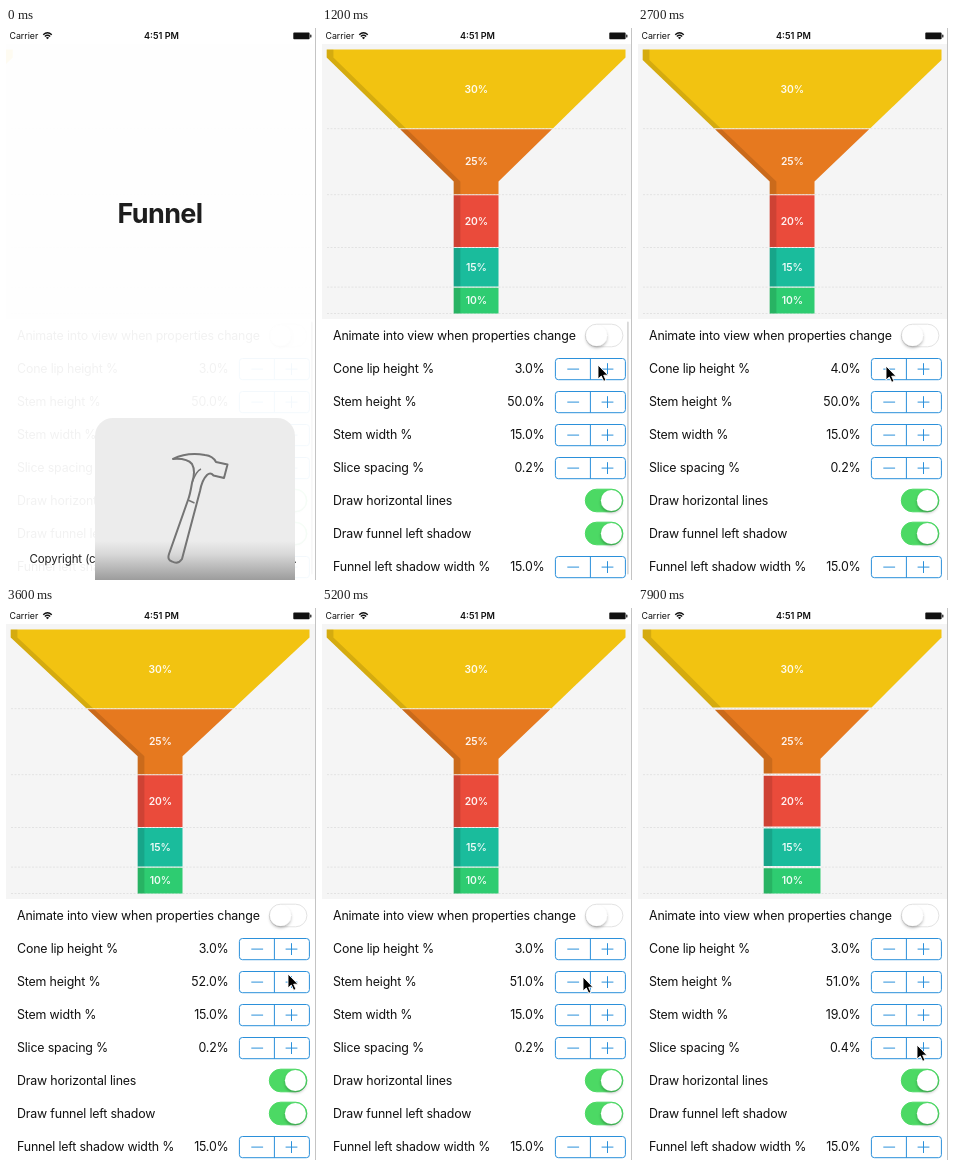
An HTML page that plays this animation: 310 by 552 pixels, repeating every 8 s.

```html
<!DOCTYPE html>
<html lang="en">
<head>
<meta charset="utf-8">
<title>Funnel chart settings</title>
<style>
  html, body { margin: 0; width: 100%; height: 100%; overflow: hidden; background: #fff; }
  svg { display: block; width: 100vw; height: 100vh; font-family: Inter, Roboto, sans-serif; }
  .row { font-size: 12.4px; letter-spacing: -.17px; fill: #111; }
  .label { font-size: 10.3px; font-weight: 600; letter-spacing: -.1px; fill: #fff; fill-opacity: .93; text-anchor: middle; }
</style>
</head>
<body>
<svg id="stage" viewBox="0 0 310 552">
  <defs>
    <linearGradient id="shade" x1="0" y1="0" x2="0" y2="1">
      <stop offset=".76" stop-color="#ececec"/>
      <stop offset=".84" stop-color="#d8d8d8"/>
      <stop offset="1" stop-color="#9c9c9c"/>
    </linearGradient>
    <filter id="soft" x="-50%" y="-50%" width="200%" height="200%">
      <feDropShadow dx="0" dy="2" stdDeviation="1.4" flood-opacity=".28"/>
    </filter>
  </defs>
  <rect width="310" height="552" fill="#fff"/>
  <g id="splash">
    <text x="154" y="195" text-anchor="middle" font-size="27" font-weight="700" letter-spacing="-.6" fill="#111">Funnel</text>
    <text x="23.500" y="534.5" font-size="11.5" letter-spacing="-.1" fill="#222">Copyright (c)</text>
    <text x="287.5" y="534.5" font-size="11.5" fill="#222">.</text>
  </g>
  <g id="app">
    <rect y="16" width="310" height="275" fill="#f5f5f5"/>
    <g id="chart"></g>
    <g id="table"></g>
    <rect id="scroller" x="305" y="293.5" width="1.8" height="253" rx=".9" fill="#8b8b8b"/>
  </g>
  <g id="hud">
    <path d="M89 552V408a18 18 0 0 1 18-18H271a18 18 0 0 1 18 18V552Z" fill="url(#shade)"/>
    <path d="M167 431Q181 424 199 427Q207 428 210 434L221.500 436.500L218 450L207.500 447.500Q204.500 444 201 447Q196 452 194 463L176 531Q172 537 166 533.500Q161 532 163 526L182 472Q184 467 186 455Q190 443 186 436Q181 430 167 431Z"
      fill="none" stroke="#747474" stroke-width="2" stroke-linejoin="round"/>
    <path d="M182 472L188.500 475M186 455Q190 443 195 441" fill="none" stroke="#747474" stroke-width="1.4"/>
  </g>
  <g fill="#111">
    <text x="3.500" y="11.200" font-size="8.8">Carrier</text>
    <text x="155.500" y="11.200" font-size="9.1" font-weight="600" text-anchor="middle">4:51 PM</text>
    <path d="M37.200 6.700Q41.500 2.700 45.800 6.700M38.800 8.500Q41.500 6 44.200 8.500" fill="none" stroke="#111" stroke-width="1.300"/>
    <path d="M41.500 11.300L39.900 9.700Q41.500 8.300 43.100 9.700Z"/>
    <rect x="287.300" y="4.600" width="16.300" height="6.700" rx=".8"/>
    <rect x="304.200" y="6.500" width="1.200" height="3" rx=".5"/>
  </g>
  <path d="M309.500 0V552" stroke="#c4c4c4"/>
  <path id="cursor" d="M0 0V14L3.300 11L5.700 16.300L8 15.300L5.700 10.200H10Z" fill="#000" stroke="#fff" stroke-width=".9" stroke-linejoin="round"/>
</svg>
<script>
const LOOP = 8000, STEP = 100;
const BOX = { x: 4.7, y: 21.5, w: 298.8, h: 264 };
const SLICES = [[30, '#f2c311'], [25, '#e6791f'], [20, '#ea4b3b'], [15, '#1abc9c'], [10, '#2ecc71']];
const ROWS = [
  ['Animate into view when properties change', false],
  ['Cone lip height %', 'lip'],
  ['Stem height %', 'stem'],
  ['Stem width %', 'width'],
  ['Slice spacing %', 'gap'],
  ['Draw horizontal lines', true],
  ['Draw funnel left shadow', true],
  ['Funnel left shadow width %', 'shadow']
];
const START = { lip: 3, stem: 50, width: 15, gap: .2, shadow: 15 };
// Stepper presses: time, property, change
const PRESSES = [
  [1300, 'lip', 1], [1500, 'lip', 1], [1800, 'lip', 1],
  [2400, 'lip', -1], [2600, 'lip', -1], [2800, 'lip', -1],
  [3300, 'stem', 1], [3500, 'stem', 1], [3900, 'stem', 1],
  [4600, 'stem', -1], [4900, 'stem', -1],
  [5700, 'width', 1], [5900, 'width', 1], [6100, 'width', 1], [6300, 'width', 1],
  [7100, 'gap', .1], [7400, 'gap', .1]
];
const CURSOR = [
  [700, 262, 420], [1100, 276, 337], [2000, 276, 337], [2300, 248, 338], [2850, 248, 338],
  [3200, 282, 366], [4100, 282, 366], [4500, 261, 369], [5200, 261, 369],
  [5600, 284, 403], [6350, 284, 403], [6600, 288, 417], [7000, 279, 437]
];

const $ = id => document.getElementById(id);
const clamp = v => Math.max(0, Math.min(1, v));

function add(parent, tag, attrs, text) {
  const node = document.createElementNS('http://www.w3.org/2000/svg', tag);
  set(node, attrs);
  if (text) node.textContent = text;
  return parent.appendChild(node);
}
function set(node, attrs) {
  for (const key in attrs) node.setAttribute(key, attrs[key]);
}

function addSwitch(y, on) {
  add($('table'), 'rect', {
    x: 263.3, y: y - 11.3, width: 37.6, height: 22.6, rx: 11.3,
    fill: on ? '#4cd964' : '#fff', stroke: on ? '#4cd964' : '#e3e3e3'
  });
  add($('table'), 'circle', { cx: on ? 289.4 : 274.6, cy: y, r: 10.5, fill: '#fff', filter: 'url(#soft)' });
}
function addStepper(y) {
  const blue = { fill: 'none', stroke: '#2b90da', 'stroke-width': 1 };
  add($('table'), 'rect', { x: 233.4, y: y - 10.6, width: 70, height: 21.2, rx: 3, ...blue });
  add($('table'), 'path', { d: `M268.400 ${y - 10.6}v21.2M245.300 ${y}h11.800M279.600 ${y}h11.800M285.500 ${y - 5.9}v11.800`, ...blue });
}

const values = {};
ROWS.forEach(([name, kind], i) => {
  const y = 307.5 + 33 * i;
  add($('table'), 'text', { x: 11, y: y + 4.4, class: 'row' }, name);
  if (typeof kind === 'boolean') return addSwitch(y, kind);
  values[kind] = add($('table'), 'text', { x: 222.6, y: y + 4.8, class: 'row', 'text-anchor': 'end' });
  addStepper(y + .6);
});

let total = 0;
const bands = SLICES.map(([share, color]) => {
  const top = BOX.y + BOX.h * total / 100;
  total += share;
  return { share, color, top, bottom: BOX.y + BOX.h * total / 100 };
});
bands.forEach(b => add($('chart'), 'path', {
  d: `M5 ${b.bottom}H304`, stroke: '#dedede', 'stroke-width': .8, 'stroke-dasharray': '2 1.5'
}));
bands.forEach(b => {
  b.group = add($('chart'), 'g', {});
  b.body = add(b.group, 'path', { fill: b.color });
  b.shade = add(b.group, 'path', { fill: '#000', opacity: .12 });
  b.label = add($('chart'), 'text', { x: 154.3, y: (b.top + b.bottom) / 2 + 3.5, class: 'label' }, b.share + '%');
});

function settingsAt(t) {
  const s = { ...START };
  for (const [time, key, change] of PRESSES) if (t >= time) s[key] += change;
  return s;
}

function drawFunnel(s, t) {
  const stemWidth = BOX.w * s.width / 100;
  const inset = (BOX.w - stemWidth) / 2;
  const lipY = BOX.y + BOX.h * s.lip / 100;
  const neckY = BOX.y + BOX.h * (1 - s.stem / 100);
  const shadow = stemWidth * s.shadow / 100;
  const left = y => BOX.x + inset * clamp((y - lipY) / (neckY - lipY));
  const right = y => 2 * BOX.x + BOX.w - left(y);
  const halfGap = s.gap * 2.8;

  bands.forEach((b, i) => {
    const top = b.top + (i ? halfGap : 0);
    const bottom = b.bottom - (i < bands.length - 1 ? halfGap : 0);
    const ys = [top, ...[lipY, neckY].filter(y => y > top && y < bottom), bottom];
    const outline = edge => 'M' + [
      ...ys.map(y => [left(y), y]),
      ...ys.slice().reverse().map(y => [edge(y), y])
    ].map(p => p.map(v => v.toFixed(2))).join('L') + 'Z';
    set(b.body, { d: outline(right) });
    set(b.shade, { d: outline(y => left(y) + shadow) });

    const rest = 1 - clamp((t + 3 - 52.5 * i) / 400);
    set(b.group, { transform: `translate(${-right(top) * rest ** 3} 0)` });
    set(b.label, { opacity: clamp((t - 340 - 70 * i) / 60) });
  });
}

function moveCursor(t) {
  const next = CURSOR.findIndex(k => k[0] > t);
  let [, x, y] = CURSOR[CURSOR.length - 1];
  if (next > 0) {
    const [a, b] = [CURSOR[next - 1], CURSOR[next]];
    const p = (t - a[0]) / (b[0] - a[0]);
    const e = p * p * (3 - 2 * p);
    x = a[1] + (b[1] - a[1]) * e;
    y = a[2] + (b[2] - a[2]) * e;
  }
  set($('cursor'), { transform: `translate(${x} ${y})`, opacity: next === 0 ? 0 : 1 });
}

function render(t) {
  const reveal = clamp(.05 + t / 260);
  set($('app'), { opacity: reveal });
  set($('splash'), { opacity: t ? 1 - reveal : 1 });
  set($('hud'), { opacity: 1 - clamp(t / 300) });
  set($('scroller'), { opacity: 1 - clamp((t - 1000) / 300) });
  const s = settingsAt(t);
  for (const key in values) values[key].textContent = s[key].toFixed(1) + '%';
  drawFunnel(s, t);
  moveCursor(t);
}

const begin = performance.now();
function tick() {
  const t = (performance.now() - begin) % LOOP;
  render(Math.floor(t / STEP) * STEP);
  requestAnimationFrame(tick);
}
tick();
</script>
</body>
</html>
```
